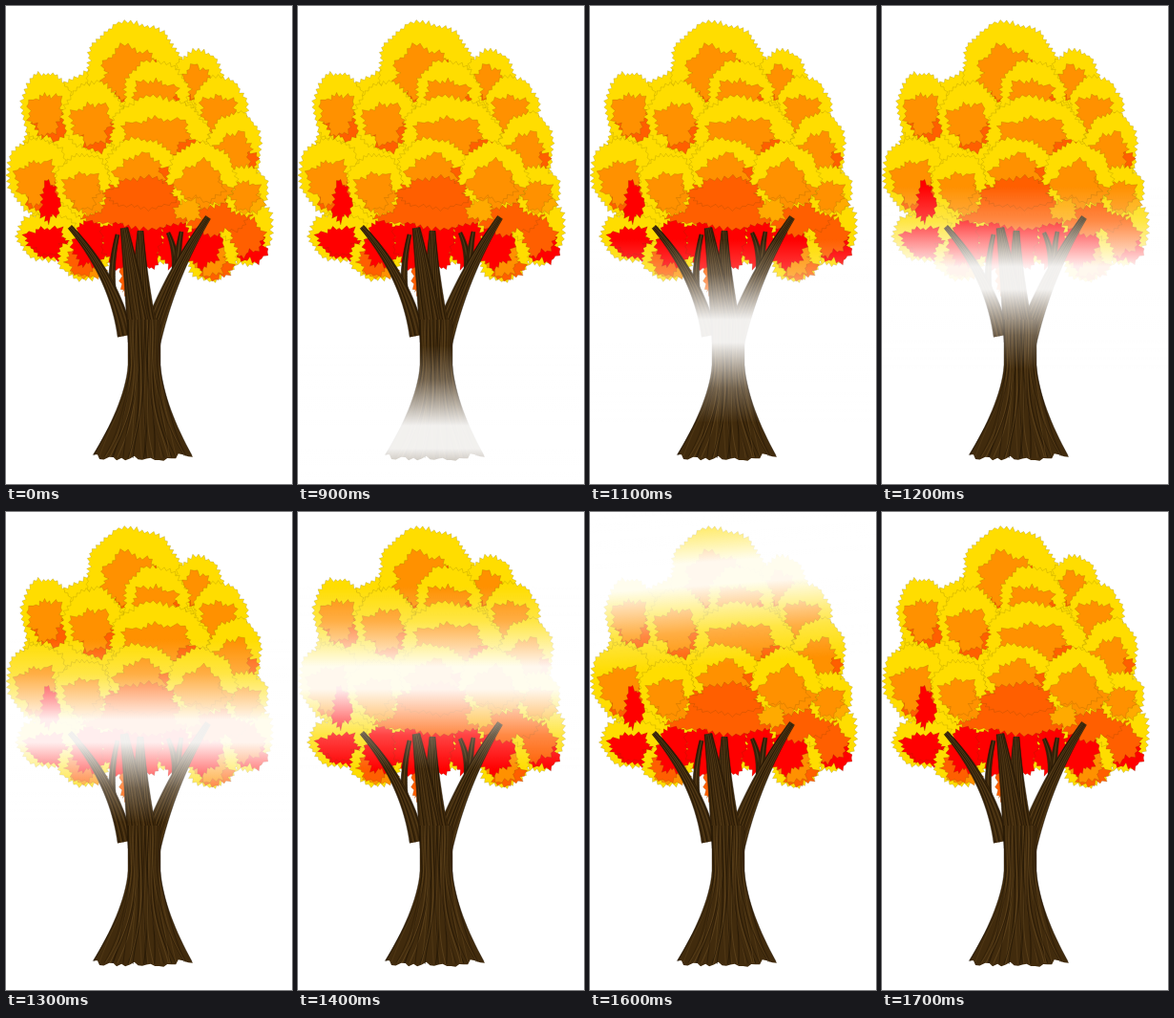
Recreate the animation shown at these times as an HTML page with a canvas. Size 300x500 px, loop 1.8 s.

```html
<!DOCTYPE html>
<html lang="en">
<head>
<meta charset="utf-8">
<title>Autumn tree</title>
<style>
html, body { margin: 0; width: 100%; height: 100%; overflow: hidden; background: #fff; }
.stage { position: relative; width: 100%; height: 100%; overflow: clip; contain: strict; }
canvas { display: block; }
.shine {
  position: absolute; left: -30px; top: -100px; width: 360px; height: 200px;
  background: linear-gradient(#fff0 2%, #fff4 20%, #fff9 32%, #fffe 44%, #fffe 56%, #fff9 68%, #fff4 80%, #fff0 98%);
  animation: sweep 1800ms infinite, show 1800ms step-end infinite;
}
@keyframes sweep {
  0% { translate: 0 451px; }
  50% { translate: 0 451px; animation-timing-function: steps(8); }
  94.444%, 100% { translate: 0 7px; }
}
@keyframes show {
  0% { opacity: 0; rotate: 0deg; }
  50% { opacity: 1; rotate: 0deg; }
  83.333% { opacity: 1; rotate: -4deg; }
  94.444%, 100% { opacity: 0; rotate: 0deg; }
}
</style>
</head>
<body>
<div class="stage">
  <canvas width="300" height="500"></canvas>
  <div class="shine"></div>
</div>
<script>
const ctx = document.querySelector('canvas').getContext('2d');
const YELLOW = '#ffdd00', AMBER = '#ffaa00', ORANGE = '#ff9100', DEEP = '#ff5f00', RED = '#ff0000';

let seed = 11;
const rnd = () => (seed = seed * 16807 % 2147483647) / 2147483647;

// An ellipse with uneven lobes and a fringe of small leaf tips.
function blob(color, x, y, rx, ry, lobes = .1) {
  const n = 2 * Math.round((rx + ry) * .55), phase = rnd() * 6;
  ctx.beginPath();
  for (let i = 0; i < n; i++) {
    const a = i / n * 2 * Math.PI;
    const k = 1 + lobes * (Math.sin(3 * a + phase) + Math.sin(7 * a + 2 * phase)) * .7;
    const tip = (i % 2 ? 1 : -1) * (.5 + rnd() * 2.2);
    ctx.lineTo(x + Math.cos(a) * (rx * k + tip), y + Math.sin(a) * (ry * k + tip));
  }
  ctx.closePath();
  ctx.fillStyle = color;
  ctx.fill();
  ctx.strokeStyle = 'rgba(80,60,0,.4)';
  ctx.lineWidth = .4;
  ctx.stroke();
}

// A yellow rim, open at the bottom, around lit leaves and their shade.
function clump(x, y, rx, ry, light = ORANGE, shade = DEEP) {
  blob(YELLOW, x, y, rx, ry, .05);
  blob(shade, x + rx * .18, y + ry * .46, rx * .62, ry * .5, .16);
  blob(light, x - rx * .04, y + ry * .18, rx * .66, ry * .58, .16);
}

function drawCrown() {
  blob(YELLOW, 138, 165, 125, 108, .02);

  clump(43, 241, 31, 25, RED, RED);
  clump(252, 234, 27, 36, DEEP, RED);
  clump(215, 262, 27, 25, ORANGE, DEEP);
  clump(82, 264, 27, 22, DEEP, ORANGE);
  blob(DEEP, 125, 278, 5, 25);
  for (let x = 88; x < 220; x += 30) blob(RED, x, 248, 17, 26, .14);

  const upper = [
    [134, 62, 50, 44], [202, 75, 26, 28], [157, 90, 34, 32], [43, 106, 27, 36],
    [224, 106, 28, 32], [91, 116, 31, 36], [240, 147, 28, 35], [160, 130, 51, 34], [33, 177, 31, 39]
  ];
  upper.forEach(c => clump(...c));

  blob(RED, 46, 205, 10, 20, .2);
  blob(DEEP, 140, 205, 72, 27, .08);
  blob(DEEP, 222, 216, 32, 23, .12);

  clump(251, 193, 23, 26, ORANGE, AMBER);
  clump(142, 168, 37, 29);
  clump(81, 187, 28, 32, ORANGE, ORANGE);
  clump(205, 178, 36, 34, ORANGE, ORANGE);
  blob(DEEP, 143, 196, 36, 16, .12);
  blob(AMBER, 191, 214, 14, 11, .14);
}

// Fills a band of bark; at(t, u) gives a point along (t) and across (u).
function bark(at, strands, hem = 0) {
  const steps = [...Array(25).keys()].map(i => i / 24);
  const line = pts => pts.forEach(p => ctx.lineTo(...p));
  ctx.beginPath();
  line(steps.map(t => at(t, -1)));
  line(steps.map(s => at(1 + (rnd() - .5) * hem, s * 2 - 1)));
  line(steps.map(t => at(1 - t, 1)));
  ctx.fillStyle = '#412b0d';
  ctx.fill();
  for (let i = 0; i <= strands; i++) {
    const u = i / strands * 2 - 1, phase = rnd() * 6, edge = Math.abs(u) === 1;
    ctx.beginPath();
    line(steps.map(t => at(t, edge ? u : u + Math.sin(t * 7 + phase) * .06)));
    ctx.strokeStyle = edge || i % 2 ? 'rgba(25,15,3,.6)' : 'rgba(112,82,38,.5)';
    ctx.lineWidth = .5 + rnd() * .6;
    ctx.stroke();
  }
}

// A branch tapering along a quadratic curve.
function branch(x0, y0, cx, cy, x1, y1, w0, w1) {
  const mix = (a, b, t) => a + (b - a) * t;
  bark((t, u) => {
    const ax = mix(x0, cx, t), ay = mix(y0, cy, t), bx = mix(cx, x1, t), by = mix(cy, y1, t);
    const len = Math.hypot(bx - ax, by - ay), w = mix(w0, w1, t) * u / len;
    return [mix(ax, bx, t) - (by - ay) * w, mix(ay, by, t) + (bx - ax) * w];
  }, Math.round(w0));
}

function drawTrunk() {
  branch(113, 308, 108, 278, 117, 239, 4, 2);
  branch(125, 345, 114, 284, 67, 231, 8, 2.5);
  branch(178, 274, 178, 255, 170, 237, 4, 2);
  branch(179, 272, 181, 252, 184, 236, 4, 2);
  branch(151, 352, 171, 283, 212, 221, 11, 3);
  branch(147, 350, 140, 290, 141, 235, 14, 3);
  branch(142, 350, 133, 285, 124, 232, 14, 4);
  bark((t, u) => {
    const flare = Math.max(0, t * 1.49 - .49) ** 1.6;
    return [145 - flare * 2 + u * (17 + 35 * flare), 328 + 142 * t + (1 - u * u) * 3 * t];
  }, 30, .05);
}

ctx.lineJoin = 'round';
drawCrown();
drawTrunk();
</script>
</body>
</html>
```
